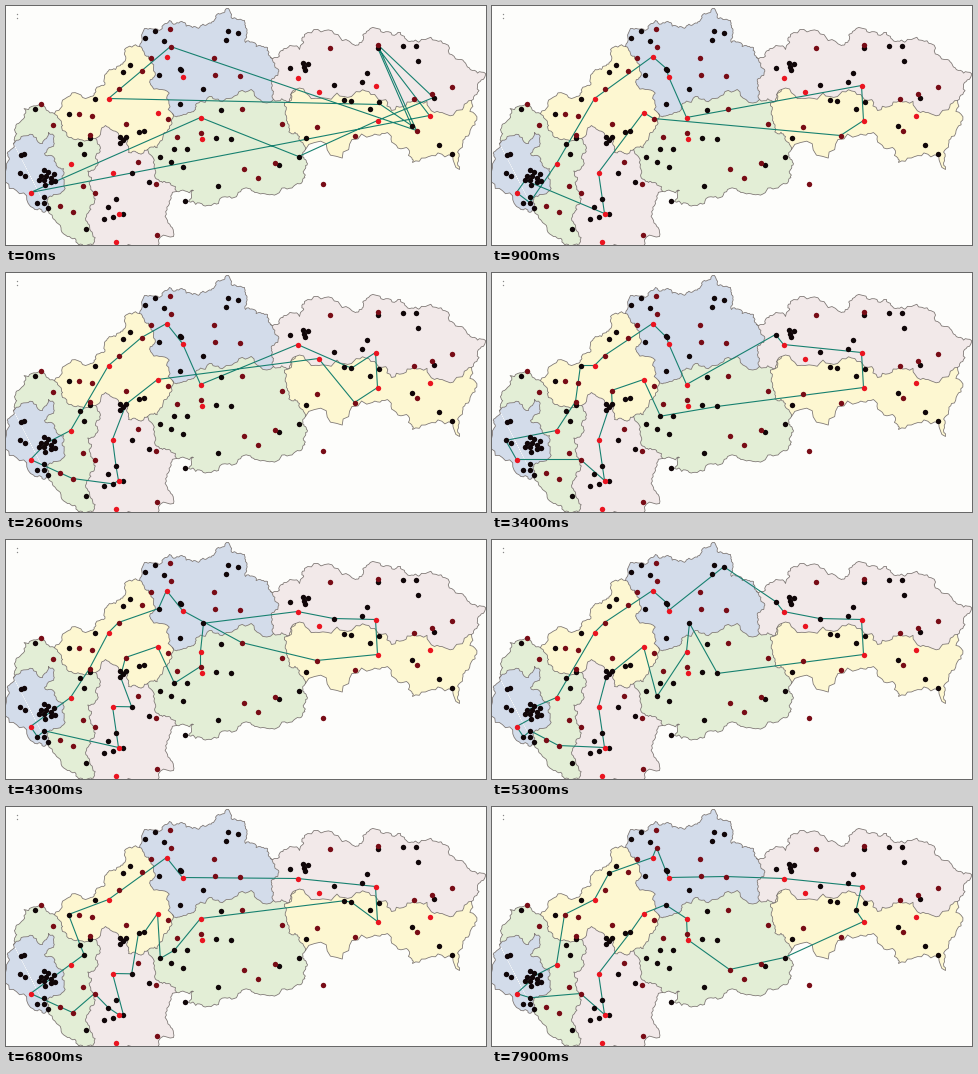
Write a matplotlib script that moves like this. It is 480x239 px and loops after 8 s.

```python
import numpy as np
import matplotlib.pyplot as plt
from matplotlib.animation import FuncAnimation

W, H, DPI = 480, 239, 80
PX = 72 / DPI
FRAMES, INTERVAL = 80, 100

BLUE, PINK, YELLOW, GREEN = "#d3dcea", "#f2e9e9", "#fdf7d1", "#e3eed6"
BLACK, DARK, RED = "#100608", "#780c16", "#ea1420"

# Junctions of the region borders.
NW, N, E, SE, S, SW, W_CITY, W_TOP, W_YELLOW = (
    (133, 40), (264, 51), (465, 94), (299, 143), (170, 185), (86, 239),
    (42, 205), (7, 137), (48, 107))
WEST, MID, TOP, CENTRE, EAST = (
    (89, 132), (141, 143), (166, 107), (267, 93), (289, 83))

# Each border is a few key points; roughen() adds the jagged detail.
BORDERS = {
    "nw": [W_YELLOW, (82, 91), (97, 79), (109, 63), (118, 43), NW],
    "n": [NW, (138, 22), (163, 14), (186, 21), (207, 15), (220, 2), (238, 14),
          (239, 36), (261, 41), N],
    "ne": [N, (278, 42), (293, 43), (298, 28), (349, 39), (360, 25),
           (394, 26), (419, 33), (452, 53), (479, 67), (471, 80), E],
    "se": [E, (459, 130), (453, 163), (406, 156), (400, 141), (366, 129), SE],
    "s": [SE, (299, 162), (291, 177), (256, 187), (242, 182), (212, 197),
          (182, 195), (187, 184), S],
    "sw": [S, (163, 197), (167, 230), (125, 239), SW],
    "w": [SW, (61, 230), (50, 216), W_CITY],
    "far_w": [W_CITY, (24, 200), (2, 154), W_TOP],
    "west_top": [W_TOP, (12, 117), (33, 98), W_YELLOW],
    "city": [W_TOP, (36, 137), (42, 126), (47, 132), (38, 147), (57, 162),
             (47, 188), W_CITY],
    "yellow_west": [W_YELLOW, (56, 124), WEST],
    "west_pink": [WEST, (91, 155), (83, 178), (88, 195), (80, 210), SW],
    "yellow_pink": [WEST, (99, 119), (112, 127), (122, 146), MID],
    "pink_green": [MID, (148, 158), (156, 176), S],
    "yellow_green": [MID, (156, 133), (165, 118), TOP],
    "yellow_blue": [NW, (147, 62), (144, 78), TOP],
    "blue_green": [TOP, (184, 106), (190, 97), (222, 92), CENTRE],
    "blue_pink": [N, (272, 63), (266, 72), CENTRE],
    "pink_mid": [CENTRE, (283, 95), EAST],
    "east_pink": [EAST, (345, 90), (385, 104), (428, 106), E],
    "east_green": [EAST, (280, 114), (293, 130), SE],
}

# A leading minus walks the border backwards.
REGIONS = [
    (GREEN, "west_top yellow_west west_pink w -city"),
    (BLUE, "city -far_w"),
    (YELLOW, "nw yellow_blue -yellow_green -yellow_pink -yellow_west"),
    (PINK, "yellow_pink pink_green sw -west_pink"),
    (BLUE, "n blue_pink -blue_green -yellow_blue"),
    (GREEN, "yellow_green blue_green pink_mid east_green s -pink_green"),
    (PINK, "ne -east_pink -pink_mid -blue_pink"),
    (YELLOW, "east_pink se -east_green"),
]

# Clusters of villages: x, y, count, spread.
CLUSTERS = [
    (41, 171, 11, 9), (16, 148, 2, 2), (16, 168, 2, 3), (35, 195, 3, 6),
    (78, 137, 3, 11), (116, 132, 4, 5), (135, 125, 2, 3), (120, 62, 2, 5),
    (107, 206, 5, 14), (134, 171, 2, 10), (150, 30, 3, 13), (174, 63, 2, 1),
    (225, 27, 3, 9), (299, 60, 4, 5), (185, 90, 2, 14), (168, 152, 5, 17),
    (217, 132, 2, 8), (408, 45, 3, 14), (358, 71, 2, 5), (341, 94, 2, 4),
    (368, 99, 2, 6), (439, 143, 2, 8),
]
VILLAGES = [
    (28, 102), (41, 201), (79, 222), (88, 92), (62, 107), (152, 68),
    (292, 150), (272, 158), (211, 179), (214, 103), (178, 194), (283, 61),
    (327, 78), (427, 91), (299, 131), (405, 119), (371, 41)]
TOWNS = [
    (34, 97), (46, 118), (83, 128), (76, 179), (88, 186), (66, 205),
    (53, 199), (131, 155), (149, 177), (150, 228), (135, 64), (112, 82),
    (85, 109), (72, 107), (119, 117), (161, 112), (164, 40), (163, 22),
    (144, 51), (207, 51), (208, 68), (233, 69), (323, 41), (371, 38),
    (445, 80), (425, 87), (407, 92), (348, 129), (310, 120), (410, 124),
    (316, 177), (275, 117), (268, 156), (251, 171), (237, 162), (235, 102),
    (170, 130), (194, 126)]
CITIES = [(109, 235), (195, 132), (312, 85), (423, 109)]
# Every mature tour calls at all hubs.
HUBS = [(24, 186), (64, 157), (106, 166), (112, 207), (102, 92), (151, 106),
        (160, 50), (176, 70), (194, 111), (291, 71), (369, 79), (371, 114)]
FIRST_TOUR = [(24, 186), (194, 111), (292, 150), (371, 114), (427, 91),
              (371, 38), (410, 124), (164, 40), (102, 92), (374, 98),
              (405, 119), (371, 41), (423, 109)]


def roughen(points, rng):
    """Midpoint displacement turns a coarse border into a jagged one."""
    points = np.array(points, float)
    for _ in range(4):
        step = np.diff(points, axis=0)
        normal = step[:, ::-1] * (1, -1)
        shift = rng.uniform(-0.28, 0.28, (len(step), 1))
        shift *= np.hypot(*step.T)[:, None] > 2.5
        middle = points[:-1] + step / 2 + normal * shift
        points = np.insert(points, np.arange(1, len(points)), middle, axis=0)
    return points


def cluster(x, y, count, spread, rng):
    """Spread dots over a disc along a sunflower spiral."""
    i = np.arange(count)
    radius = spread * (np.sqrt((i + 0.5) / count) if count > 2 else 1)
    turn = np.pi if count == 2 else 2.4
    angle = rng.uniform(0, 2 * np.pi) + turn * i
    return [*zip(x + radius * np.cos(angle), y + radius * np.sin(angle))]


def length(tour):
    return np.hypot(*(np.array(tour) - np.roll(tour, 1, axis=0)).T).sum()


def insert(tour, stop):
    """Add a stop where it lengthens the tour least."""
    options = [tour[:i] + [stop] + tour[i:] for i in range(1, len(tour) + 1)]
    return min(options, key=length)


def untangle(tour, tries, rng):
    """Reverse random stretches, keeping those that shorten the tour."""
    for _ in range(tries):
        i, j = sorted(rng.integers(1, len(tour) + 1, 2))
        changed = tour[:i] + tour[i:j][::-1] + tour[j:]
        tour = min(tour, changed, key=length)
    return tour


def paused(frame):
    return frame in (3, 6) or (frame > 60 and frame % 5 == 1)


def evolve(places, rng):
    """One tour per frame: swap some detours, take in a hub, untangle."""
    tour = FIRST_TOUR
    tours = [tour]
    for frame in range(1, FRAMES):
        if not paused(frame):
            detours = [stop for stop in tour if stop not in HUBS]
            for k in rng.permutation(len(detours))[:3]:
                tour = [stop for stop in tour if stop != detours[k]]
            missing = [hub for hub in HUBS if hub not in tour]
            if missing:
                tour = insert(tour, missing[rng.integers(len(missing))])
            while len(tour) < min(13 + 0.3 * frame, 26):
                picks = [places[k] for k in rng.integers(len(places), size=3)]
                options = [insert(tour, p) for p in picks if p not in tour]
                tour = min(options, key=length, default=tour)
            tour = untangle(tour, 8, rng)
        tours.append(tour)
    return tours


fig = plt.figure(figsize=(W / DPI, H / DPI), dpi=DPI, facecolor="#fdfdfb")
ax = fig.add_axes([0, 0, 1, 1])
ax.set(xlim=(-0.5, W - 0.5), ylim=(H - 0.5, -0.5))
ax.axis("off")

rng = np.random.default_rng(4)
edges = {name: roughen(points, rng) for name, points in BORDERS.items()}
for color, path in REGIONS:
    outline = [edges[n[1:]][::-1] if n[0] == "-" else edges[n]
               for n in path.split()]
    ax.fill(*np.concatenate(outline).T, facecolor=color, edgecolor="none")
for edge in edges.values():
    ax.plot(*edge.T, color="#7d7673", lw=0.8 * PX)

villages = VILLAGES + [dot for c in CLUSTERS for dot in cluster(*c, rng)]
tours = evolve(villages + TOWNS + CITIES, rng)

ax.scatter([10, 10], [7, 11], s=1.5, color="#888888", linewidths=0)
route, = ax.plot([], [], color="#16806f", lw=1.1 * PX, zorder=3)
for color, dots in [(BLACK, villages), (DARK, TOWNS), (RED, CITIES + HUBS)]:
    ax.scatter(*zip(*dots), s=(5.4 * PX) ** 2, color=color, linewidths=0,
               zorder=4)


def update(frame):
    tour = tours[frame]
    route.set_data(*zip(*tour, tour[0]))
    return route,


anim = FuncAnimation(fig, update, frames=FRAMES, interval=INTERVAL,
                     repeat=True, repeat_delay=0, blit=False)
plt.show()
```
